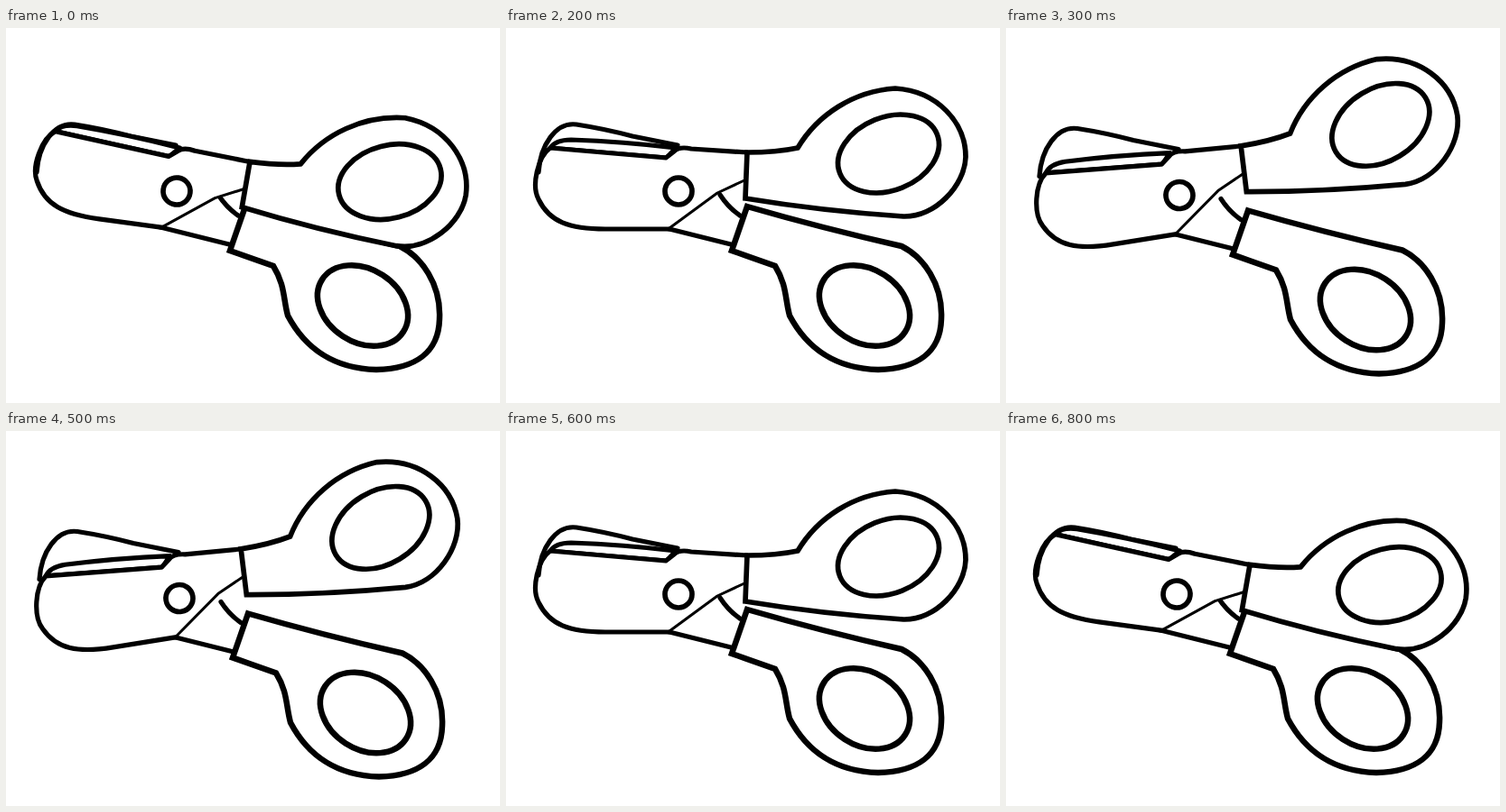
An HTML page for the animation above (0.9 s loop, 547 by 416 pixels).

```html
<!DOCTYPE html>
<html lang="en">
<head>
<meta charset="utf-8">
<title>Scissors</title>
<style>
  html, body { margin: 0; width: 100%; height: 100%; overflow: hidden; background: #fff; }
  svg { display: block; width: 100%; height: 100%; fill: #fff; stroke: #000; }
  svg { stroke-linecap: round; stroke-linejoin: round; }
  #lower { stroke-width: 6.5; }
  #upper { stroke-width: 5.7; }
  .line { fill: none; }
  .blade { stroke-width: 5.2; }
  .thin { fill: none; stroke-width: 3; }
  .handle { stroke-linejoin: miter; }
</style>
</head>
<body>
<svg viewBox="0 0 547 416">
  <g id="scissors">
    <g id="lower">
      <path class="line blade" d="M36 160C38 130 55 104 78 107Q110 112 140 120L190 130"/>
      <path class="line blade" d="M165 219L249 240"/>
      <path class="line blade" d="M237 185Q246 199 259 208"/>
      <path class="handle" d="M267 198Q350 222 438 242C462 254 484 284 482 323C481 360 455 378 412 379
        C365 378 333 355 314 319C309 301 311 285 298 264L250 247Z"/>
      <ellipse rx="53.5" ry="40.5" transform="translate(397 308) rotate(33)"/>
    </g>
    <g id="upper">
      <path class="blade" d="M49 133Q55 124 72 124Q130 126 188 133L178 144Q115 139 49 133Z"/>
      <path stroke="none" d="M267 138L205 134L177 144L49 133L36 190L110 223L181 223L234 183L264 169Z"/>
      <path class="blade line" d="M267 138L205 134Q192 131 186 137L177 144L49 133
        C35 143 28 175 36 190C48 215 70 223 110 223L181 223"/>
      <path class="thin" d="M181 222L234 183L264 169"/>
      <circle cx="191" cy="181" r="15"/>
      <path class="handle" d="M267 138Q300 138 323 133C345 96 385 70 431 67C478 70 509 105 509 143
        C508 175 475 210 440 209Q350 203 265 189Z"/>
      <ellipse rx="58" ry="40.5" transform="translate(423.5 139.5) rotate(-22)"/>
    </g>
  </g>
</svg>
<script>
const STEP = 100;
const ANGLES = [7.6, 3.8, 0, -9.2, -17]; // closed to wide open
const WIDEST = ANGLES.length - 1;
const STEPS = 2 * WIDEST + 1;

const scissors = document.getElementById('scissors');
const upper = document.getElementById('upper');

// Opens one pose per step, then closes the same way
function render(ms) {
  const step = Math.floor(ms / STEP) % STEPS;
  const pose = WIDEST - Math.abs(WIDEST - step);
  const drop = pose > 2 ? 4.5 : 0;
  scissors.setAttribute('transform', `translate(${pose - 2} ${drop})`);
  upper.setAttribute('transform', `rotate(${ANGLES[pose]} 191 181)`);
}

const start = performance.now();
function tick() {
  render(performance.now() - start);
  requestAnimationFrame(tick);
}
tick();
</script>
</body>
</html>
```
